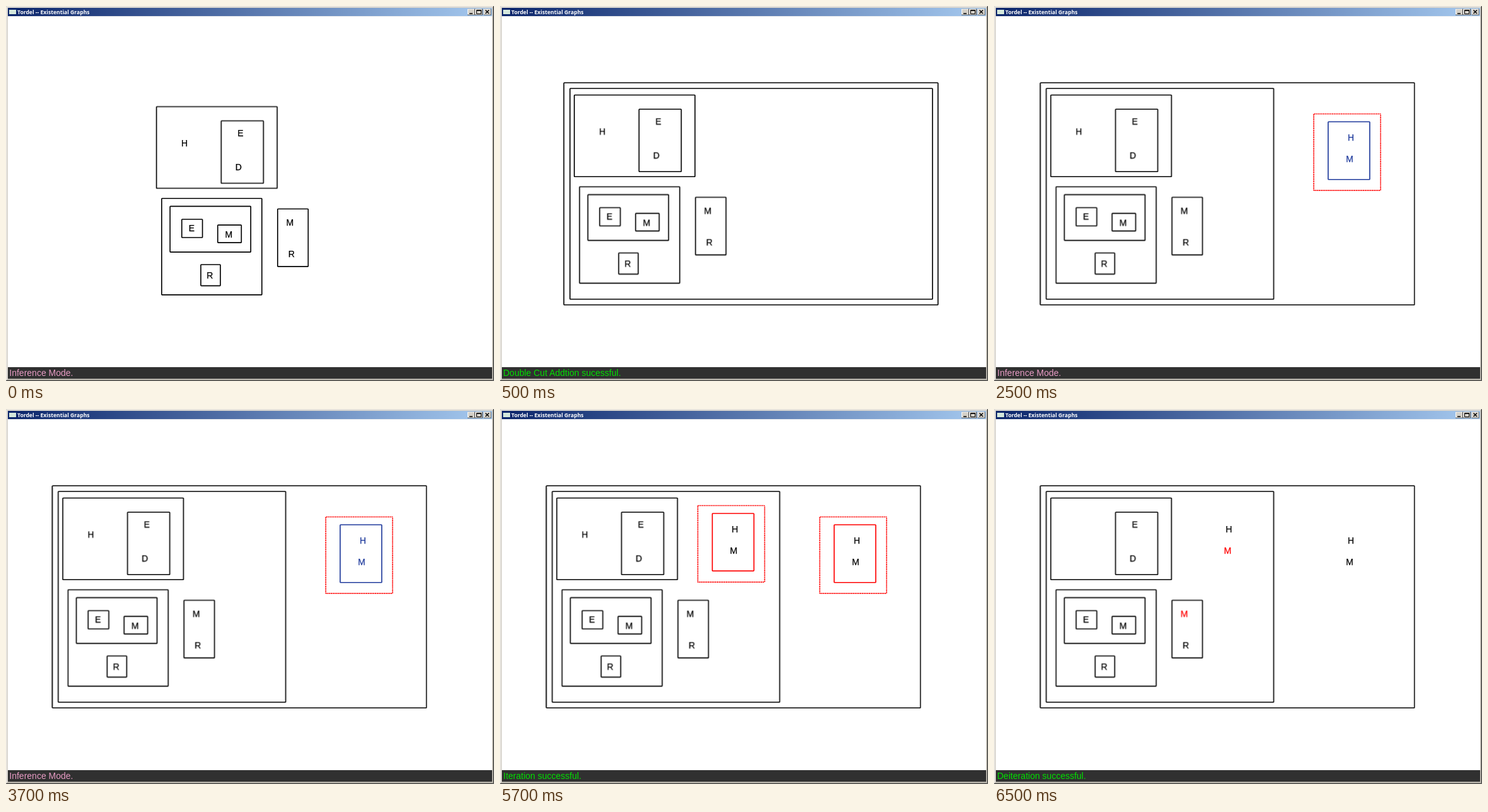
An HTML page that plays this animation: 774x596 px, repeating every 8 s.

```html
<!DOCTYPE html>
<html lang="en">
<head>
<meta charset="utf-8">
<title>Existential Graphs</title>
<style>
html, body { margin: 0; width: 100%; height: 100%; overflow: hidden; background: #fff; }
svg { display: block; width: 774px; height: 596px; }

.cuts rect { fill: none; stroke: #000; stroke-width: 1.65; rx: .8px; }
.cuts text, .status text { font: 14px "Liberation Sans", Arial, sans-serif; }
.cuts text { text-anchor: middle; stroke: currentColor; stroke-width: .25; fill: currentColor; color: #000; }
.cuts .dotted { stroke: #f00; stroke-width: 1.7; stroke-dasharray: 2 .8; }
.title { font: bold 8.6px "Open Sans", sans-serif; fill: #fff; }
.ok { fill: #00e000; }
.mode { fill: #e79bc4; }

/* Hard cuts at 500, 2500, 4500 and 6500 ms */
.graph, .s1, .s2, .s3, .s4, .s02, .from1, .from2, .from3, .s23, .to3,
.red4, .cuts .blue2, .cuts .frame { animation: 8s step-end infinite; }
.graph { animation-name: shift; }
.s1 { animation-name: s1; }
.s3 { animation-name: s3; }
.s4 { animation-name: s4; }
.s02 { animation-name: s02; }
.s23 { animation-name: s23; }
.from1 { animation-name: from1; }
.from2 { animation-name: from2; }
.from3 { animation-name: from3; }
.to3 { animation-name: to3; }
.cuts .red4 { animation-name: red4; }
.cuts .blue2 { animation-name: blue2; }
.cuts .frame { animation-name: frame; }

@keyframes shift {
  0% { transform: translate(120.8px, 18.5px); }
  6.25% { transform: translate(0, 0); }
  31.25%, 100% { transform: translate(-27.8px, 0); }
}
@keyframes s1 { 0% { opacity: 0; } 6.25% { opacity: 1; } 31.25%, 100% { opacity: 0; } }
@keyframes s3 { 0% { opacity: 0; } 56.25% { opacity: 1; } 81.25%, 100% { opacity: 0; } }
@keyframes s4 { 0% { opacity: 0; } 81.25%, 100% { opacity: 1; } }
@keyframes s02 { 0% { opacity: 1; } 6.25% { opacity: 0; } 31.25% { opacity: 1; } 56.25%, 100% { opacity: 0; } }
@keyframes s23 { 0% { opacity: 0; } 31.25% { opacity: 1; } 81.25%, 100% { opacity: 0; } }
@keyframes from1 { 0% { opacity: 0; } 6.25%, 100% { opacity: 1; } }
@keyframes from2 { 0% { opacity: 0; } 31.25%, 100% { opacity: 1; } }
@keyframes from3 { 0% { opacity: 0; } 56.25%, 100% { opacity: 1; } }
@keyframes to3 { 0% { opacity: 1; } 81.25%, 100% { opacity: 0; } }
@keyframes red4 { 0% { color: #000; } 81.25%, 100% { color: #f00; } }
@keyframes blue2 { 0% { color: #1f3a9c; } 56.25%, 100% { color: #000; } }
@keyframes frame { 0% { stroke: #1f3a9c; } 56.25%, 100% { stroke: #f00; } }
</style>
</head>
<body>
<svg viewBox="0 0 774 596">
  <defs>
    <linearGradient id="bar">
      <stop offset="0" stop-color="#0a246a"/>
      <stop offset="1" stop-color="#a6caf0"/>
    </linearGradient>
    <g id="button">
      <path d="M0 0h12v10h-12z" fill="#404040"/>
      <path d="M0 0h11v9h-11z" fill="#fff"/>
      <path d="M1 1h10v8h-10z" fill="#d4d0c8"/>
    </g>
  </defs>

  <!-- Window -->
  <rect width="774" height="596" fill="#d4d0c8"/>
  <path d="M1 595V1H773" fill="none" stroke="#f4f2ee"/>
  <path d="M0 595.5H773.5V0" fill="none" stroke="#484848"/>
  <path d="M1 594.5H772.5V1" fill="none" stroke="#858279"/>
  <rect x="3" y="3" width="768" height="13.3" fill="url(#bar)"/>
  <rect x="3" y="16.3" width="768" height="558" fill="#fff"/>
  <rect x="5" y="6" width="11" height="7" fill="#d5e8dc"/>
  <text class="title" x="18" y="12.7">Tordel -- Existential Graphs</text>
  <use href="#button" x="732" y="4.5"/>
  <use href="#button" x="744" y="4.5"/>
  <use href="#button" x="757.5" y="4.5"/>
  <g fill="none" stroke="#000">
    <path d="M735 12H740" stroke-width="1.5"/>
    <path d="M746.5 6.5H753.5V12.5H746.5ZM746.5 7.3H753.5"/>
    <path d="M760.5 6.5L766 12M766 6.5L760.5 12" stroke-width="1.4"/>
  </g>

  <g class="cuts">
    <g class="graph">
      <g class="from1"><rect x="101.3" y="122" width="593.4" height="353"/></g>
      <g class="s1"><rect x="111" y="131" width="575" height="335"/></g>
      <g class="from2"><rect x="110.6" y="131" width="360.8" height="335"/></g>

      <rect x="117.8" y="141.5" width="191.5" height="129.7"/>
      <rect x="220.5" y="164" width="67" height="99.2"/>
      <g class="to3"><text x="162.3" y="204.5">H</text></g>
      <text x="251" y="188.7">E</text>
      <text x="248" y="242.7">D</text>

      <rect x="126.1" y="287.2" width="158.9" height="153.4"/>
      <rect x="139.4" y="299.8" width="128" height="72.8"/>
      <rect x="158" y="320.5" width="32.8" height="29"/>
      <rect x="215" y="329.6" width="37.5" height="28"/>
      <rect x="188.2" y="392.5" width="31" height="33.6"/>
      <text x="173.6" y="339.5">E</text>
      <text x="232.5" y="349.8">M</text>
      <text x="202.6" y="414.5">R</text>

      <rect x="310" y="304" width="48.5" height="91.6"/>
      <text class="red4" x="329.5" y="330.7">M</text>
      <text x="332" y="380.7">R</text>
    </g>

    <g class="from2">
      <g class="s23">
        <rect class="dotted" x="507.2" y="171.5" width="106" height="121.6"/>
        <rect class="frame" x="530" y="184" width="66" height="91.7"/>
      </g>
      <text class="blue2" x="566" y="213.7">H</text>
      <text class="blue2" x="564" y="247.9">M</text>
    </g>

    <g class="from3">
      <g class="s3">
        <rect class="dotted" x="313.7" y="153.5" width="106" height="121.6"/>
        <rect x="336.7" y="166" width="66" height="91.4" style="stroke:#f00"/>
      </g>
      <text x="372.5" y="195.7">H</text>
      <text class="red4" x="370.5" y="229.9">M</text>
    </g>
  </g>

  <g class="status">
    <rect x="3" y="574" width="768" height="18.5" fill="#303030"/>
    <text class="mode s02" x="5.3" y="587.5">Inference Mode.</text>
    <text class="ok s1" x="5" y="587.5">Double Cut Addtion sucessful.</text>
    <text class="ok s3" x="5.3" y="587.5">Iteration successful.</text>
    <text class="ok s4" x="5" y="587.5">Deiteration successful.</text>
  </g>
</svg>
</body>
</html>
```
